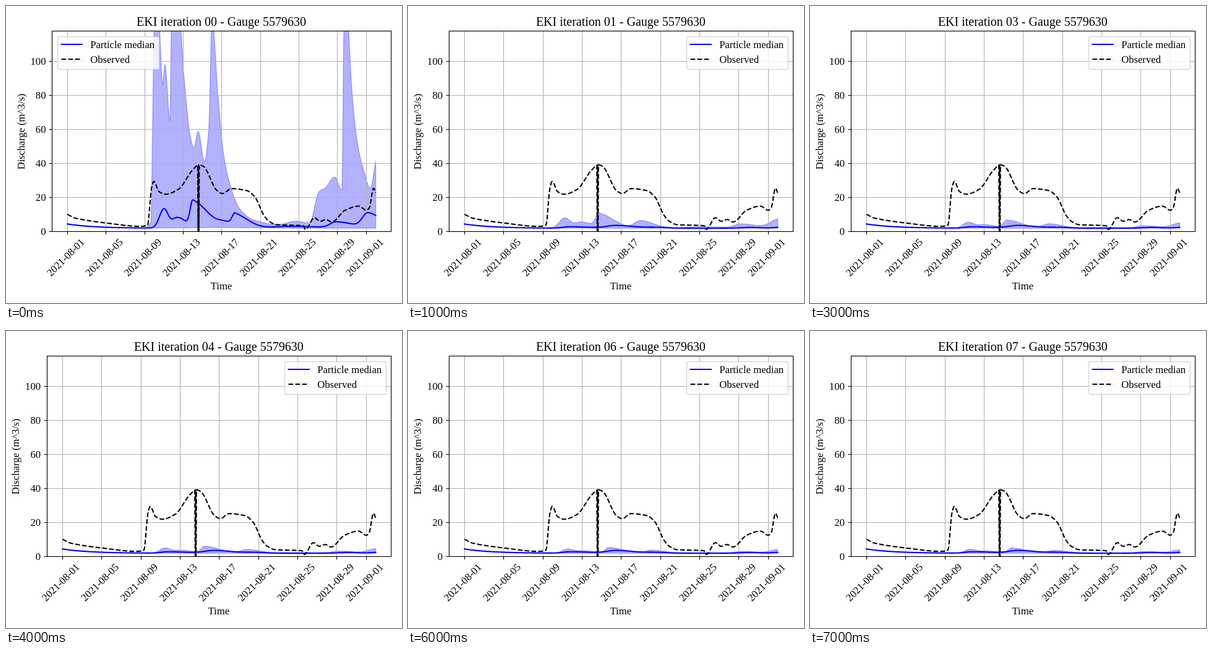
Write an HTML page with a canvas that moves like this. It is 640 px wide and 480 px high and loops after 8 s.

```html
<!DOCTYPE html>
<html lang="en">
<head>
<meta charset="utf-8">
<title>Discharge by iteration</title>
<style>
  html, body { margin: 0; width: 100%; height: 100%; overflow: hidden; background: #fff; }
  canvas { display: block; width: 640px; height: 480px; }
</style>
</head>
<body>
<canvas id="stage" width="640" height="480"></canvas>
<script>
const ctx = document.getElementById('stage').getContext('2d');
const FONT = '"Liberation Serif", "Times New Roman", serif';
const RIGHT = 622.4, TOP = 40.5, ZERO = 364.4, UNIT = 2.75, EM = 16.667;
const STEP_MS = 1000, STEPS = 8, HOURS = 767;

// The first iteration uses slightly narrower axes than the rest.
const NARROW = { left: 74.4, origin: 99.3, day: 15.59, labelX: 29.5, legendX: 83.5 };
const WIDE = { left: 66, origin: 91.4, day: 15.835, labelX: 21.3, legendX: 450.5 };

// Every curve is a function from day to discharge.
const recession = t => 1.9 + 2.5 * Math.exp(-t / 2.8);

// Recession plus lopsided bell pulses: [peak day, height, rise, fall, drift].
const flood = (pulses, scale = 1, shift = 0) => t =>
  pulses.reduce((sum, [peak, height, rise, fall, drift = 0]) => {
    const d = t - peak - drift * shift;
    return sum + scale * height * Math.exp(-((d / (d < 0 ? rise : fall)) ** 2));
  }, recession(t));

// Cubic through [day, discharge] turning points without overshoot.
function smooth(keys) {
  const slope = i => (keys[i + 1][1] - keys[i][1]) / (keys[i + 1][0] - keys[i][0]);
  const tangent = i => {
    if (i === 0) return slope(0);
    if (i === keys.length - 1) return slope(i - 1);
    const a = slope(i - 1), b = slope(i);
    return a * b > 0 ? 2 * a * b / (a + b) : 0;
  };
  return t => {
    const next = keys.findIndex(k => k[0] > t);
    const i = (next < 0 ? keys.length - 1 : Math.max(next, 1)) - 1;
    const [t0, v0] = keys[i], [t1, v1] = keys[i + 1];
    const h = t1 - t0, u = (t - t0) / h, w = 1 - u;
    return v0 * (1 + 2 * u) * w * w + v1 * (3 - 2 * u) * u * u
      + h * u * w * (tangent(i) * w - tangent(i + 1) * u);
  };
}

const gauge = smooth([
  [0, 10.1], [0.8, 7.9], [4, 5], [7.6, 3], [8.3, 3.7], [8.72, 25.6], [8.95, 29.4],
  [9.5, 23.4], [10.2, 21.9], [11.5, 24.8], [13, 36.3], [13.65, 39.2], [14.1, 38.2],
  [15.5, 24.1], [16.1, 22.3], [17, 25.2], [18.6, 24], [19.4, 20.5], [20.4, 9.2],
  [20.9, 6], [21.7, 4], [24.45, 3.4], [24.67, 1.2], [25.6, 8.1], [26.2, 6], [26.8, 7],
  [27.4, 5.6], [28.8, 12.5], [30.2, 14.9], [31, 12.5], [31.3, 14], [31.73, 25.4], [31.96, 22.7]]);
const isDropout = hour => hour === 325 || hour === 327;
const observed = t => isDropout(Math.round(t * 24)) ? 0 : gauge(t);

const storm = smooth([
  [8.2, 2.4], [8.66, 6], [8.78, 42], [8.97, 118], [9.3, 180], [9.57, 118], [9.88, 86.5],
  [10.1, 98], [10.63, 65], [10.76, 118], [11.2, 240], [11.78, 118], [12.2, 83.5],
  [12.7, 57], [13.1, 49], [13.55, 58.8], [14.2, 41], [14.65, 60], [14.99, 125],
  [15.6, 80], [16.2, 45], [16.9, 26.7], [17.8, 13.8], [19.2, 7], [21.8, 4.1],
  [23.65, 6], [25.1, 5], [26.1, 23.5], [26.7, 25.4], [27.7, 32], [28.45, 24.3],
  [28.65, 118], [28.9, 190], [29.17, 118], [29.6, 75], [30.1, 50.7], [30.7, 36],
  [31.4, 25.5], [31.96, 41.3]]);

const prior = {
  upper: t => t < 8.2 ? recession(t) : storm(t),
  lower: flood([[16, 0.4, 5, 6]]),
  median: flood([[10, 11.2, 0.65, 0.6], [11.4, 6.3, 0.8, 1.3], [13, 15.3, 0.38, 2.2],
    [16.4, 2.8, 1, 1], [17.4, 7.7, 0.45, 1.9], [23, 1.1, 2.5, 5], [27.9, 3.4, 0.9, 2.5],
    [31.15, 8.5, 0.8, 2]])
};

const settledMedian = flood([[10.7, 0.85, 0.9, 3], [15.5, 1.6, 1.4, 2.5],
  [19.6, 0.5, 1.5, 1.6], [29.2, 0.5, 1.4, 1.5], [32, 0.5, 0.8, 1]]);
const spread = [[10.2, 5.9, 0.75, 0.8, 0.18], [11.9, 3.6, 0.9, 1.6, 0.1],
  [13.75, 8, 0.5, 2.1, 0.55], [18, 4.4, 0.9, 1.8, 0.6], [24.5, 0.9, 3, 3],
  [28.3, 2.4, 1, 2.2], [32.1, 5.4, 1.2, 1]];

// The spread shrinks and its peaks come later with each iteration.
const curves = n => n === 0 ? prior : {
  upper: flood(spread, 1 / Math.sqrt(n), Math.log(n)),
  lower: recession,
  median: settledMedian
};

const sample = (curve, axes) => Array.from({ length: HOURS + 1 }, (_, hour) =>
  [axes.origin + hour / 24 * axes.day, ZERO - UNIT * curve(hour / 24)]);

function path(points) {
  ctx.beginPath();
  points.forEach(p => ctx.lineTo(...p));
}

function pen(color, width, dash = [], cap = 'butt') {
  ctx.strokeStyle = color;
  ctx.lineWidth = width;
  ctx.setLineDash(dash);
  ctx.lineCap = cap;
  ctx.lineJoin = 'round';
}
const medianPen = () => pen('#00f', 2.08, [], 'square');
const observedPen = () => pen('#000', 2.08, [7.71, 3.33]);

function line(x0, y0, x1, y1) {
  path([[x0, y0], [x1, y1]]);
  ctx.stroke();
}

function text(str, x, y, align = 'center', angle = 0, size = EM, dy = 0) {
  ctx.save();
  ctx.translate(x, y);
  ctx.rotate(angle);
  ctx.font = `${size}px ${FONT}`;
  ctx.textAlign = align;
  ctx.fillStyle = '#000';
  ctx.fillText(str, 0, dy);
  ctx.restore();
}

const crisp = v => Math.floor(v) + 0.5;
const dayTicks = [0, 4, 8, 12, 16, 20, 24, 28, 31];
const valueTicks = [0, 20, 40, 60, 80, 100];
const dateLabel = d => d < 31 ? `2021-08-${String(d + 1).padStart(2, '0')}` : '2021-09-01';

function drawBand(upper, lower) {
  path([...upper, ...lower.reverse()]);
  ctx.closePath();
  ctx.fillStyle = 'rgba(0,0,255,0.3)';
  ctx.fill();
  pen('rgba(0,0,255,0.3)', 1.39);
  ctx.stroke();
}

function drawLegend(x) {
  ctx.beginPath();
  ctx.roundRect(x, 49.5, 164, 53, 3.3);
  ctx.fillStyle = 'rgba(255,255,255,0.8)';
  ctx.fill();
  pen('rgba(204,204,204,0.8)', 1.39);
  ctx.stroke();
  const from = x + 6, to = from + 2 * EM;
  medianPen();
  line(from, 62, to, 62);
  observedPen();
  line(from, 86, to, 86);
  text('Particle median', to + 13.3, 67.5, 'left');
  text('Observed', to + 13.3, 92, 'left');
}

function draw(iteration) {
  const axes = iteration === 0 ? NARROW : WIDE;
  const { upper, lower, median } = curves(iteration);
  const left = crisp(axes.left), right = crisp(RIGHT), bottom = crisp(ZERO);
  const middle = (axes.left + RIGHT) / 2;
  const tickX = d => axes.origin + d * axes.day;
  const tickY = v => crisp(ZERO - v * UNIT);

  ctx.fillStyle = '#fff';
  ctx.fillRect(0, 0, 640, 480);

  ctx.save();
  ctx.beginPath();
  ctx.rect(left, TOP, right - left, bottom - TOP);
  ctx.clip();
  drawBand(sample(upper, axes), sample(lower, axes));
  pen('#b0b0b0', 1.11);
  dayTicks.forEach(d => line(crisp(tickX(d)), TOP, crisp(tickX(d)), bottom));
  valueTicks.forEach(v => line(left, tickY(v), right, tickY(v)));
  medianPen();
  path(sample(median, axes));
  ctx.stroke();
  observedPen();
  path(sample(observed, axes));
  ctx.stroke();
  ctx.restore();

  pen('#000', 1.11);
  ctx.lineJoin = 'miter';
  ctx.strokeRect(left, TOP, right - left, bottom - TOP);
  dayTicks.forEach(d => {
    line(crisp(tickX(d)), bottom, crisp(tickX(d)), bottom + 4.9);
    text(dateLabel(d), tickX(d), 409.3, 'center', -Math.PI / 4, EM, 1.2);
  });
  valueTicks.forEach(v => {
    line(left - 4.9, tickY(v), left, tickY(v));
    text(String(v), axes.left - 9.9, tickY(v) + 5.6, 'right');
  });

  text(`EKI iteration 0${iteration} - Gauge 5579630`, middle - 0.4, 32, 'center', 0, 20);
  text('Time', middle - 0.4, 458);
  text('Discharge (m^3/s)', axes.labelX, 203, 'center', -Math.PI / 2);
  drawLegend(axes.legendX);
}

function tick() {
  draw(Math.floor(performance.now() / STEP_MS) % STEPS);
  requestAnimationFrame(tick);
}
tick();
</script>
</body>
</html>
```
